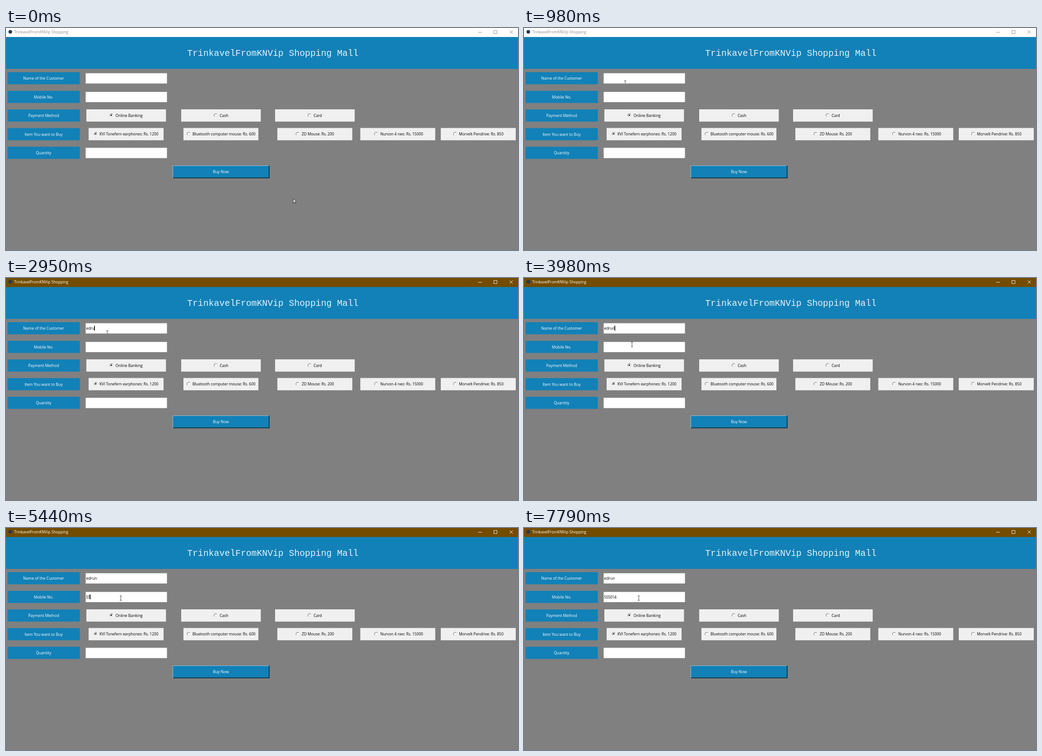
Write an HTML page that moves like this. It is 1134x494 px and loops after 8 s.

```html
<!DOCTYPE html>
<html lang="en">
<head>
<meta charset="utf-8">
<title>Shopping form</title>
<style>
  html, body { margin: 0; width: 100%; height: 100%; overflow: hidden; background: #808080; }
  svg { display: block; width: 1134px; height: 494px; }
  text { font-family: "Open Sans", "Noto Sans", sans-serif; font-size: 8.5px; white-space: pre; }
  .item { font-size: 8.35px; }
  .digits { letter-spacing: -0.36px; }
  .head { font-family: "Liberation Mono", "Courier New", monospace; font-size: 19.75px; }
</style>
</head>
<body>
<svg id="stage" viewBox="0 0 1134 494"></svg>
<script>
const LOOP = 8000;
const BLUE = "#1281b7";
const SHOP = "TrinkavelFromKNVip Shopping";
const NAME = "edrun";
const PHONE = "555014";
const stage = document.getElementById("stage");

function add(tag, attrs, parent = stage) {
  const node = document.createElementNS("http://www.w3.org/2000/svg", tag);
  for (const key in attrs) node.setAttribute(key, attrs[key]);
  return parent.appendChild(node);
}
const rect = (x, y, width, height, fill, parent) =>
  add("rect", { x, y, width, height, fill }, parent);
const path = (d, stroke, width = 1, parent) =>
  add("path", { d, stroke, "stroke-width": width, fill: "none" }, parent);
function text(str, x, y, attrs = {}) {
  const node = add("text", { x, y, ...attrs });
  node.textContent = str;
  return node;
}
const centered = fill => ({ "text-anchor": "middle", fill });

// Window frame
rect(0, 0, 1134, 494, "#808080");
const bar = rect(0, 0, 1134, 20, "#fff");
add("circle", { cx: 9.5, cy: 8.5, r: 4, fill: "#27394f" });
const barTitle = text(SHOP, 18, 12);
const controls = path("M1046 9.5h8M1080.5 5.5h7v7h-7zM1115.5 5.5l7 7m0-7l-7 7", "#888", 0.9);
rect(0, 20, 1134, 71, BLUE);
text(SHOP + " Mall", 591, 62, { ...centered("#e6f2f8"), class: "head" });

// Form rows
["Name of the Customer", "Mobile No.", "Payment Method", "Item You want to Buy", "Quantity"]
  .forEach((label, i) => {
    const y = 98.3 + i * 41.5;
    rect(3.5, y, 160, 27, BLUE);
    text(label, 83.3, y + 16.7, centered("#fff"));
  });

const clip = add("clipPath", { id: "fields" }, add("defs", {}));
for (const y of [100.5, 142, 266.5]) {
  rect(176.3, y, 180.2, 23, "#fff");
  path(`M176.5 ${y + 23}V${y + 0.3}H356.5`, "#b4b4b4", 0.6);
  rect(176.3, y, 180.2, 23, "#000", clip);
}

function option(label, x, y, width, dotX, textX, on, cls = "") {
  rect(x, y, width, 27.3, "#f0f0f0");
  const cy = y + 13;
  add("circle", { cx: dotX, cy, r: 3.9, fill: "#fff", stroke: "#d5d5d5", "stroke-width": 0.7 });
  path(`M${dotX - 2.6} ${cy + 2.6}A3.7 3.7 0 0 1 ${dotX + 2.6} ${cy - 2.6}`, "#606060", 1);
  if (on) add("circle", { cx: dotX, cy, r: 1.6, fill: "#000" });
  text(label, textX, y + 16.8, { class: cls, fill: "#000" });
}
option("Online Banking", 178, 181, 176.3, 233.5, 242.5, true);
option("Cash", 388, 181, 176.3, 464.3, 473.2, false);
option("Card", 596, 181, 176.3, 672.3, 681.2, false);
[
  ["KVI Tonefern earphones: Rs. 1200", 183, 198.8, 207],
  ["Bluetooth computer mouse: Rs. 600", 393, 404.5, 413],
  ["ZD Mouse: Rs. 200", 601, 645.7, 655],
  ["Nurvon 4 neo: Rs. 15000", 784.7, 819.7, 829],
  ["Morvelt Pendrive: Rs. 850", 963, 994.7, 1003.3]
].forEach(([label, x, dotX, textX], i) =>
  option(label, x, 222.5, 166, dotX, textX, i === 0, "item"));

rect(369, 306, 214.5, 28.3, BLUE);
path("M369.5 334V306.5H583", "#8fc3df", 1);
path("M370 333.5H582.8V306", "#10202a", 1.5);
text("Buy Now", 476, 323, centered("#fff"));

// Moving parts
const fields = [
  { str: NAME, node: text("", 177.5, 115), caretY: 106.2 },
  { str: PHONE, node: text("", 177.5, 156.5, { class: "digits" }), caretY: 147.6 }
];
const caret = rect(0, 0, 1.6, 11, "#000");
const halo = add("circle", { r: 9.3, fill: "#d5d20c", "fill-opacity": 0.8 });
const beamLayer = add("g", { "clip-path": "url(#fields)" });
const beam = path("M-2 .5H2.4M.2 .5V10.5M-2 10.5H2.4", "#333", 0.9, beamLayer);
const arrow = add("path", {
  d: "M.4 .4V9.8L2.6 7.8L4.1 11.3L5.6 10.6L4.1 7.3H7Z",
  fill: "#fff", stroke: "#111", "stroke-width": 0.8
});

// time, field, characters, caret visible
const typing = [
  [0, 0, 0, 0], [1130, 0, 0, 1], [1760, 0, 0, 0], [2080, 0, 0, 1],
  [2390, 0, 1, 1], [2560, 0, 2, 1], [2710, 0, 3, 1], [2860, 0, 3, 0],
  [2950, 0, 4, 1], [3110, 0, 5, 1], [4510, 1, 0, 1], [5130, 1, 0, 0],
  [5210, 1, 1, 1], [5440, 1, 2, 1], [5690, 1, 3, 1], [5990, 1, 4, 1],
  [6320, 1, 4, 0], [6550, 1, 5, 1], [6780, 1, 6, 1], [6930, 1, 6, 0],
  [7180, 1, 6, 1], [7790, 1, 6, 0]
];

// time, pointer, x, y
const moves = [[0, "arrow", 636, 379.5]];
for (let k = 1; k <= 11; k++) {
  const p = k / 11, e = p * p * (3 - 2 * p);
  moves.push([70 + 75 * (k - 1), "arrow", 636 - 414 * e, 379.5 - 247.5 * e]);
}
moves.push(
  [900, "beam", 224, 119], [980, "beam", 224, 117], [3420, "beam", 224, 118],
  [3980, "beam", 239, 142.5], [4050, "arrow", 252, 166], [4120, "arrow", 253.5, 168],
  [4190, "beam", 254, 156], [4260, "beam", 254, 152], [4340, "beam", 254, 150.5]
);

// start, end, x, y
const clicks = [[1130, 1300, 222.5, 121.5], [4510, 4580, 252.8, 155.5]];

const current = (table, t) => table.findLast(row => row[0] <= t);
const show = (node, on) => node.setAttribute("visibility", on ? "visible" : "hidden");
const place = (node, x, y) => node.setAttribute("transform", `translate(${x} ${y})`);

function render(t) {
  const active = t >= 1130;
  bar.setAttribute("fill", active ? "#734c00" : "#fff");
  barTitle.setAttribute("fill", active ? "#fff" : "#8c8c8c");
  controls.setAttribute("stroke", active ? "#fff" : "#888");

  const [, focus, count, caretOn] = current(typing, t);
  fields.forEach((field, i) => {
    field.node.textContent = i < focus ? field.str : i > focus ? "" : field.str.slice(0, count);
  });
  const field = fields[focus];
  const width = count ? field.node.getComputedTextLength() : 0;
  place(caret, 176.5 + width, field.caretY);
  show(caret, caretOn);

  const [, kind, x, y] = current(moves, t);
  const pointer = kind === "beam" ? beam : arrow;
  place(pointer, x, y);
  show(beam, pointer === beam);
  show(arrow, pointer === arrow);

  const click = clicks.find(([from, to]) => t >= from && t < to);
  show(halo, click);
  if (click) place(halo, click[2], click[3]);
}

const start = performance.now();
function tick() {
  render((performance.now() - start) % LOOP);
  requestAnimationFrame(tick);
}
tick();
</script>
</body>
</html>
```
